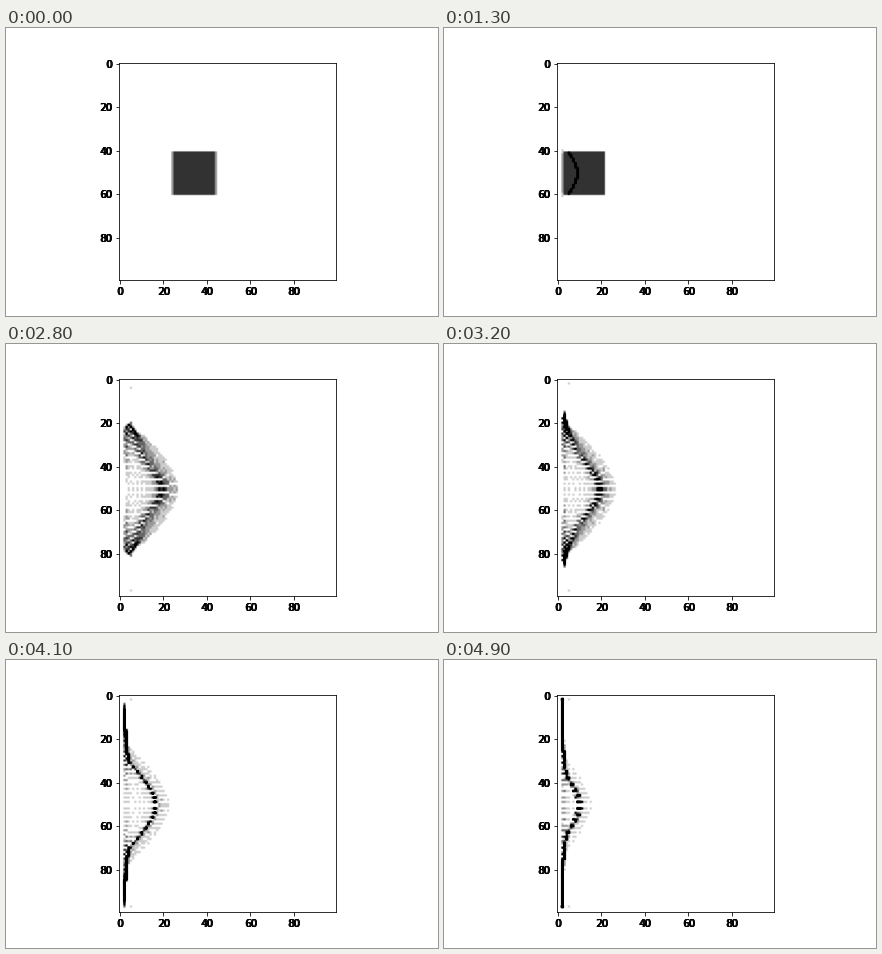
Animation, 432 px wide and 288 px high, one loop 5000 ms. Source, as a matplotlib script:

```python
import numpy as np
import matplotlib.pyplot as plt
from matplotlib.animation import FuncAnimation

GRID = 100
FRAMES = 50
SPEED, FALL = 1.39, 0.026   # leftward start speed and half the leftward pull
WALL, CENTRE = 2.0, 51

# Four particles per cell in a 20 x 20 block: depth from the left face, row offset
offsets = np.arange(0.25, 20, 0.5)
depth, row = (a.ravel() for a in np.meshgrid(offsets, offsets - 10))
mid = (depth - 10) / 10
rim = np.abs(row) / 10
back, front = np.maximum(-mid, 0), np.maximum(mid, 0)

hit_time = 13 + 0.25 * mid + 0.08 * rim**2
spread_rate = 0.128 - 0.04 * front - 0.02 * back
jets = (depth < 0.5) & (rim > 0.95)


def free_fall(t):
    return 24.5 + depth - SPEED * t - FALL * t**2


def rebound_speed():
    axis = 0.89 - 0.35 * mid + 0.24 * front**4 - 0.9 * back**5
    a = (row / 6) ** 2
    drop = (1 - front) * 1.3 * a / (1 + a) + front * 1.1 * rim**1.6
    return axis - drop


rebound = rebound_speed()


def settle(x, after):
    """Squeeze material near the wall into a layer that thickens with time."""
    layer = 0.3 + 3.7 * (1 - np.exp(-after / 8))
    squeezed = WALL + layer**2 / (2 * layer + WALL - np.minimum(x, WALL + layer))
    return np.where(x < WALL + layer, squeezed, x)


def positions(n):
    after = np.maximum(n - hit_time, 0)
    x = free_fall(np.minimum(n, hit_time)) + rebound * after - FALL * after**2
    x = settle(x, after)
    y = CENTRE + row * (1 + spread_rate * after + 0.2 * after**2 / (after**2 + 9))

    fast = jets & (after > 0)
    x = np.where(fast, np.minimum(5.2, 2.5 + after), x)
    y = np.where(fast, CENTRE + row + np.sign(row) * 2.45 * after, y)
    return x, np.clip(y, 2.05, 97.95)


def density(n):
    x, y = positions(n)
    limits = [[0, GRID], [0, GRID]]
    return np.histogram2d(y, x, bins=GRID, range=limits)[0]


fig = plt.figure(figsize=(6, 4), dpi=72, facecolor="white")
SIDE = 217.44


def make_axes(label, shift=0):
    box = [(112.68 + shift) / 432, 0.125, SIDE / 432, SIDE / 288]
    ax = fig.add_axes(box, label=label, facecolor="none")
    ax.set(xlim=(-0.5, GRID - 0.5), ylim=(GRID - 0.5, -0.5),
           xticks=range(0, GRID, 20), yticks=range(0, GRID, 20))
    ax.tick_params(labelsize=10, labelfontfamily="DejaVu Sans")
    return ax


main = make_axes("main")
image = main.imshow(density(0), cmap="gray_r", vmin=0, vmax=5, aspect="auto")

# Label-only copies give the heavy look of the tick labels
for i, shift in enumerate((0, 1, 1)):
    copy = make_axes(f"labels{i}", shift)
    copy.spines[:].set_visible(False)
    copy.tick_params(width=0)


def update(n):
    image.set_data(density(n))
    return (image,)


anim = FuncAnimation(fig, update, frames=FRAMES, interval=100,
                     repeat=True, repeat_delay=0, blit=False)
plt.show()
```
